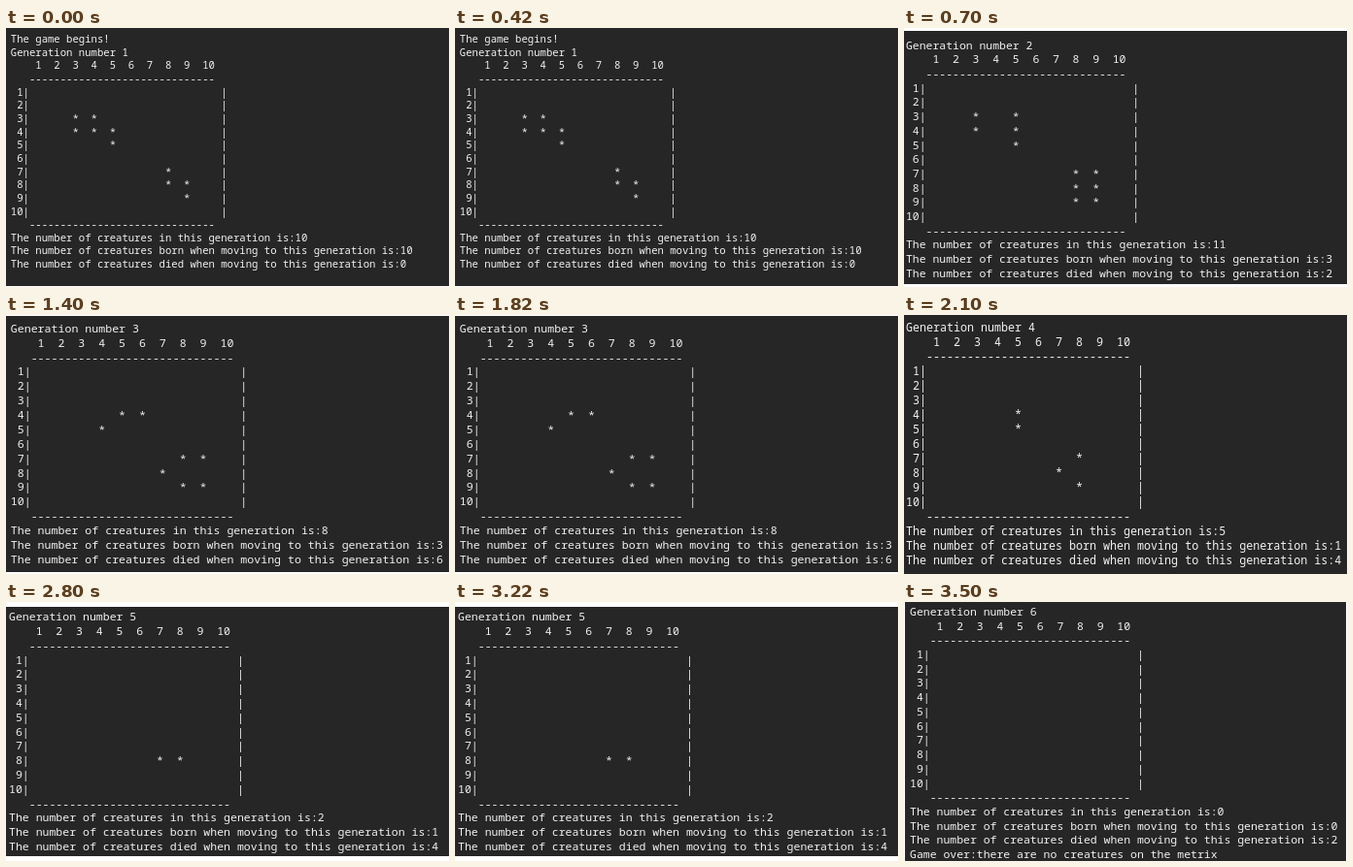
An HTML page for the animation above (4200 ms loop, 456 by 267 pixels).

```html
<!DOCTYPE html>
<html lang="en">
<head>
<meta charset="utf-8">
<title>Game of Life in a terminal</title>
<style>
  html, body { margin: 0; width: 100%; height: 100%; overflow: hidden; background: #fff; }
  #terminal { position: absolute; background: #262626; }
  pre { position: absolute; margin: 0; color: #f2f2f2; font-family: "Noto Sans Mono", monospace; line-height: 1.284; }
</style>
</head>
<body>
<div id="terminal"></div>
<pre id="output"></pre>
<script>
const SIZE = 10, STEP = 700;
const range = Array.from({ length: SIZE }, (_, i) => i + 1);
const key = (row, col) => `${row},${col}`;

// Each generation is a terminal shot with its own crop and zoom
const shot = (left, top, fontSize, inset) =>
  ({ inset, text: { left: left + "px", top: top + "px", fontSize: fontSize + "px" } });
const shots = [
  shot(4.8, 5.2, 10.62, "0 0 1px"),
  shot(2, 10.6, 11.45, "3px 0"),
  shot(4.8, 6.8, 11.6, "1px 0 2px"),
  shot(2, 5, 11.68, "0"),
  shot(3, 8.2, 11.53, "5px 0"),
  shot(6, 2.9, 11.47, "0 1px"),
];

// Conway's rules, but the outermost cells always stay empty
function evolve(cells) {
  const next = new Set();
  for (let row = 2; row < SIZE; row++) for (let col = 2; col < SIZE; col++) {
    let near = 0;
    for (const dr of [-1, 0, 1]) for (const dc of [-1, 0, 1])
      if ((dr || dc) && cells.has(key(row + dr, col + dc))) near++;
    if (near === 3 || (near === 2 && cells.has(key(row, col)))) next.add(key(row, col));
  }
  return next;
}

const missing = (a, b) => [...a].filter(cell => !b.has(cell)).length;

function report(number, cells, previous) {
  const rule = "   " + "-".repeat(3 * SIZE);
  const count = (what, n) => `The number of creatures ${what} generation is:${n}`;
  return [
    ...(number === 1 ? ["The game begins!"] : []),
    `Generation number ${number}`,
    "    " + range.join("  "),
    rule,
    ...range.map(row => String(row).padStart(2) + "|" +
      range.map(col => cells.has(key(row, col)) ? " * " : "   ").join("") + " |"),
    rule,
    count("in this", cells.size),
    count("born when moving to this", missing(cells, previous)),
    count("died when moving to this", missing(previous, cells)),
    ...(cells.size ? [] : ["Game over:there are no creatures on the metrix"]),
  ].join("\n");
}

const column = (row, col) => [key(row, col), key(row + 1, col)];
const stairs = (row, col) => [...column(row, col), ...column(row + 1, col + 1)];

let previous = new Set();
let cells = new Set([...column(3, 3), ...stairs(3, 4), ...stairs(7, 8)]);
const pages = shots.map((_, i) => {
  const page = report(i + 1, cells, previous);
  [previous, cells] = [cells, evolve(cells)];
  return page;
});

const terminal = document.getElementById("terminal");
const output = document.getElementById("output");
let shown = -1;

function draw(time) {
  const index = Math.floor(time / STEP) % pages.length;
  if (index !== shown) {
    shown = index;
    terminal.style.inset = shots[index].inset;
    Object.assign(output.style, shots[index].text);
    output.textContent = pages[index];
  }
  requestAnimationFrame(draw);
}
draw(performance.now());
</script>
</body>
</html>
```
